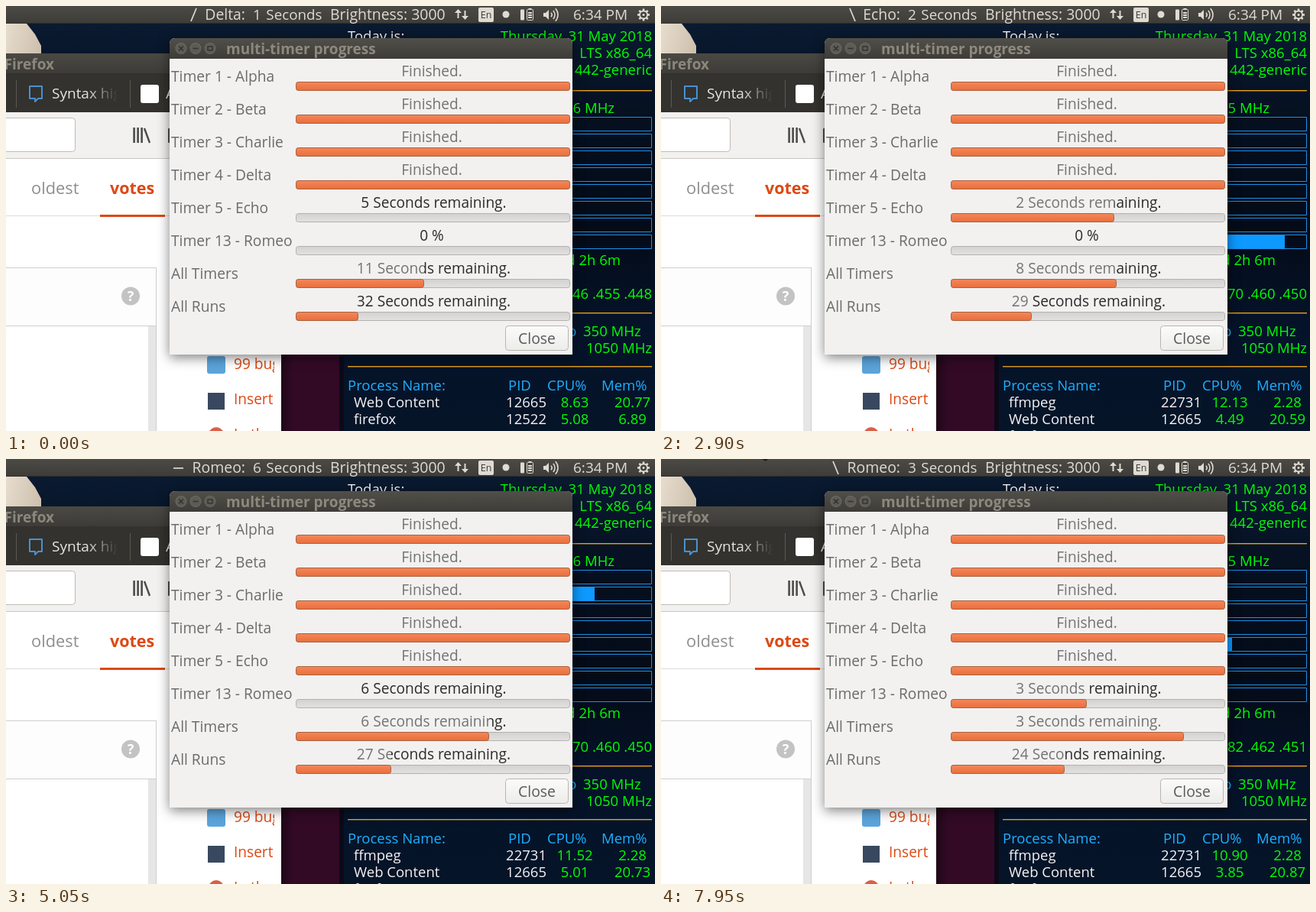
An HTML page with a canvas that plays this animation: 849 px wide and 556 px high, repeating every 8000 ms.

```html
<!DOCTYPE html>
<html lang="en">
<head>
<meta charset="utf-8">
<title>Timer progress</title>
<style>
html, body { margin: 0; width: 100%; height: 100%; overflow: hidden; background: #04101e; }
canvas { display: block; }
</style>
</head>
<body>
<canvas id="stage" width="849" height="556"></canvas>
<script>
const W = 849, H = 556, LOOP = 8000;
const FONT = '"Open Sans", "Noto Sans", sans-serif';
const GREEN = '#00ff00', CYAN = '#1cb0ff', WHITE = '#f4f4f4', ORANGE = '#dd4814';
const screen = document.getElementById('stage').getContext('2d');
let c = screen;

// [time, timer name, seconds]
const PANEL = [
  [0, 'Delta', 1], [100, 'Echo', 5], [1050, 'Echo', 4], [2250, 'Echo', 3], [2900, 'Echo', 2],
  [3850, 'Echo', 1], [5050, 'Romeo', 6], [6000, 'Romeo', 5], [6950, 'Romeo', 4], [7900, 'Romeo', 3]
];
const SPIN = '/-\\|';
const SPIN_TIMES = [0, 100, 400, 700, 1050, 2550, 2900, 3200, 3550, 3850, 4150, 4500, 4800,
  5050, 5400, 5700, 6000, 6350, 6650, 6950, 7200, 7550, 7900];

// [time, Echo seconds, Echo end, Romeo seconds, Romeo end, total seconds, total end, runs end]
const BARS = [
  [0, 5, 379, -1, 379, 11, 547, 461],
  [750, 4, 449, -1, 379, 10, 564, 472],
  [2250, 3, 521, -1, 379, 9, 580, 479],
  [2700, 2, 593, -1, 379, 8, 596, 485],
  [3700, 1, 665, -1, 379, 7, 614, 496],
  [4650, 1, 738, -1, 379, 7, 614, 496],
  [4800, 0, 738, -1, 379, 7, 614, 496],
  [4950, 0, 738, 6, 379, 6, 632, 504],
  [5650, 0, 738, 5, 436, 5, 650, 515],
  [6650, 0, 738, 4, 496, 4, 667, 522],
  [7700, 0, 738, 3, 557, 3, 684, 528]
];

// [time, clock digit, load, gpu MHz, busy core, busy end, cpu 1, mem 1, cpu 2, mem 2]
const LOAD = ['.446 .455 .448', '.470 .460 .450', '.482 .462 .451'];
const MONITOR = [
  [0, 6, 0, 350, 0, 0, '8.63', '20.77', '5.08', '6.89'],
  [450, 7, 0, 350, 0, 0, '8.52', '20.80', '5.61', '6.89'],
  [1200, 5, 0, 350, 0, 0, '8.43', '20.84', '6.07', '6.88'],
  [2250, 6, 1, 350, 0, 0, '12.31', '2.28', '4.62', '20.55'],
  [2650, 5, 1, 350, 8, 816, '12.13', '2.28', '4.49', '20.59'],
  [3400, 7, 1, 350, 0, 0, '12.08', '2.28', '4.57', '20.64'],
  [4200, 9, 1, 1033, 0, 0, '12.04', '2.28', '4.68', '20.69'],
  [4900, 6, 1, 350, 2, 770, '11.52', '2.28', '5.01', '20.73'],
  [5700, 8, 1, 350, 0, 0, '10.82', '2.28', '5.82', '20.75'],
  [6350, 6, 1, 350, 0, 0, '10.84', '2.28', '5.17', '20.79'],
  [7200, 7, 2, 350, 0, 0, '10.87', '2.28', '4.46', '20.83'],
  [7900, 5, 2, 350, 5, 747, '10.90', '2.28', '3.85', '20.87']
];

const pick = (list, t) => list.filter(s => s[0] <= t).pop();

function text(s, x, y, color, size = 19.1, align = 'left', weight = 400) {
  c.font = `${weight} ${size}px ${FONT}`;
  c.textAlign = align;
  c.fillStyle = color;
  c.fillText(s, x, y);
}
function rect(x, y, w, h, color) {
  c.fillStyle = color;
  c.fillRect(x, y, w, h);
}
function round(x, y, w, h, r, fill, stroke) {
  c.beginPath();
  c.roundRect(x, y, w, h, r);
  if (fill) { c.fillStyle = fill; c.fill(); }
  if (stroke) { c.strokeStyle = stroke; c.lineWidth = 1; c.stroke(); }
}
function disc(x, y, r, color) {
  c.beginPath();
  c.arc(x, y, r, 0, 7);
  c.fillStyle = color;
  c.fill();
}
function path(points, color, width) {
  c.beginPath();
  points.forEach(([x, y]) => c.lineTo(x, y));
  c.strokeStyle = color;
  c.lineWidth = width;
  c.stroke();
}
function poly(points, color) {
  c.beginPath();
  points.forEach(([x, y]) => c.lineTo(x, y));
  c.fillStyle = color;
  c.fill();
}
function ramp(x0, y0, x1, y1, ...colors) {
  const g = c.createLinearGradient(x0, y0, x1, y1);
  colors.forEach((k, i) => g.addColorStop(i / (colors.length - 1), k));
  return g;
}
function clipped(x, y, w, h, draw) {
  c.save();
  c.beginPath();
  c.rect(x, y, w, h);
  c.clip();
  draw();
  c.restore();
}

function wallpaper() {
  rect(0, 0, W, H, ramp(0, 23, 0, H, '#0a1a30', '#050f1f', '#040b18', '#05132a', '#061428'));
  poly([[0, 23], [27, 23], [38, 37], [46, 52], [46, 63], [0, 63]], ramp(0, 30, 46, 40, '#e6dccd', '#cfc1af'));
  rect(360, 440, 76, 116, ramp(360, 0, 376, 0, '#1f0717', '#330a26'));
  rect(436, 440, 6, 116, '#0c0a18');
}

function browser() {
  round(-10, 62, 300, 40, 6, ramp(0, 62, 0, 88, '#4b4944', '#3d3c38'));
  text('Firefox', 63, 83, '#8b877c', 19, 'right', 700);
  rect(0, 88, 214, 51, '#33322e');
  rect(13, 97, 1, 36, '#5a5954');
  rect(162, 97, 1, 36, '#5a5954');
  c.lineJoin = 'round';
  path([[32, 105], [47, 105], [47, 121], [42, 121], [38, 125], [38, 121], [31, 121], [31, 105], [34, 105]], '#4a90d0', 2);
  text('Syntax hig', 60, 121, ramp(105, 0, 146, 0, '#e8e6e1', '#33322e'), 19);
  round(176, 103, 24, 24, 3, '#fff');
  text('A', 209, 121, '#e8e6e1', 19);

  rect(0, 139, 360, 61, '#f2f1f0');
  rect(0, 199, 360, 1, '#c9c7c4');
  round(-10, 146.5, 100.5, 44, 4, '#fff', '#bdbbb8');
  [167.5, 172.5, 177.5].forEach(x => rect(x - 1.2, 159, 2.6, 20, '#4c4c4c'));
  path([[181, 160], [188, 179]], '#4c4c4c', 2.4);
  path([[217, 161], [213, 161], [213, 178], [217, 178]], '#4c4c4c', 2);

  rect(0, 200, 360, 356, '#fff');
  text('oldest', 33, 246, '#8f8f8f', 21.8);
  text('votes', 136, 246, ORANGE, 21.5, 'left', 700);
  rect(0, 274, 214, 1, '#dcdcdc');
  rect(123, 273, 85, 3, ORANGE);
  rect(0, 342, 197, 77, '#fdfdfd');
  rect(0, 342, 197, 1, '#cfcfcf');
  rect(0, 418, 197, 1, '#cfcfcf');
  rect(196, 342, 1, 214, '#cfcfcf');
  rect(186, 419, 10, 137, '#e6e6e6');
  disc(163, 379.5, 12, '#c3c3c3');
  text('?', 163, 386, '#fff', 18, 'center', 700);

  round(263, 458, 24, 23, 3, '#5ba4db');
  rect(264, 506, 22, 22, '#39485f');
  disc(275, 561, 10, '#d9604a');
  clipped(290, 440, 61, 116, () => {
    text('99 bugs', 298, 475, ORANGE);
    text('Inserting', 298, 521, ORANGE);
    text('In the', 298, 567, ORANGE);
  });
}

function panelBar() {
  const ink = '#dfdbd2';
  rect(0, 0, W, 23, ramp(0, 0, 0, 23, '#4c4a45', '#3d3c38'));
  rect(0, 22, W, 1, '#2f2e2b');
  text('Brightness: 3000', 424, 18, ink, 19.4);
  poly([[587, 9], [591.5, 4], [596, 9]], ink);
  rect(590.5, 8, 2, 8, ink);
  poly([[596, 13], [600.5, 18], [605, 13]], ink);
  rect(599.5, 6, 2, 8, ink);
  round(618, 2, 20, 19, 2, ink);
  text('En', 628, 16, '#3c3b37', 12.5, 'center');
  disc(654, 11, 4.5, ink);
  round(673, 4.5, 5, 14, 1, ink);
  round(681.5, 4.5, 8, 14, 1, null, ink);
  rect(683.5, 3, 4, 2, ink);
  [8, 11, 14].forEach(y => rect(683, y, 5, 2, ink));
  poly([[703, 9], [706, 9], [710, 5], [710, 18], [706, 14], [703, 14]], ink);
  [4, 8, 12].forEach(r => {
    c.beginPath();
    c.arc(710, 11.5, r, -0.75, 0.75);
    c.strokeStyle = ink;
    c.lineWidth = 1.6;
    c.stroke();
  });
  text('6:34 PM', 742, 18, ink, 19);
  for (let i = 0; i < 8; i++) {
    const a = i * Math.PI / 4, x = Math.cos(a), y = Math.sin(a);
    path([[834 + x * 5, 11.5 + y * 5], [834 + x * 8, 11.5 + y * 8]], ink, 2.6);
  }
  c.beginPath();
  c.arc(834, 11.5, 5, 0, 7);
  c.strokeStyle = ink;
  c.lineWidth = 1.8;
  c.stroke();
  disc(834, 11.5, 1.5, ink);
}

const info = (s, x, y, color, align) => text(s, x, y, color, 18.5, align);

function monitorBase() {
  info('Today is:', 447, 46, WHITE);
  info('Thursday, 31 May 2018', 845, 46, GREEN, 'right');
  info('LTS x86_64', 845, 68, GREEN, 'right');
  info('442-generic', 845, 90, GREEN, 'right');
  [110, 401, 471].forEach(y => rect(447, y, 398, 1.4, '#e8a11c'));
  for (let i = 0; i < 8; i++) {
    c.strokeStyle = '#1e8fe6';
    c.lineWidth = 1;
    c.strokeRect(447.5, 145.5 + i * 22, 397, 18);
  }
  info('0d 2h 6m', 804, 339, GREEN, 'right');
  info('o', 746.5, 432, CYAN, 'right');
  info('1050 MHz', 845, 454, GREEN, 'right');
  info('Process Name:', 447, 503, CYAN);
  info('PID', 657, 503, CYAN);
  info('CPU%', 708, 503, CYAN);
  info('Mem%', 779, 503, CYAN);
}

function monitor(t) {
  const [, digit, load, gpu, core, end, cpu1, mem1, cpu2, mem2] = pick(MONITOR, t);
  info(`299${digit} MHz`, 796, 140, GREEN, 'right');
  if (core) rect(448, 124 + core * 22, end - 448, 17, '#0d99ff');
  info(LOAD[load], 845, 383, GREEN, 'right');
  info(`${gpu} MHz`, 755, 432, GREEN);
  const web = ['Web Content', 12665], fox = ['firefox', 12522];
  const rows = load ? [['ffmpeg', 22731], web, fox] : [web, fox];
  rows.forEach(([name, pid], i) => {
    const y = 525 + i * 22;
    info(name, 455, y, WHITE);
    info(pid, 707, y, WHITE, 'right');
    info([cpu1, cpu2, '3.90'][i], 744, y, GREEN, 'center');
    info([mem1, mem2, '6.88'][i], 819.5, y, GREEN, 'center');
  });
}

function dialog() {
  c.save();
  c.shadowColor = 'rgba(0,0,0,.5)';
  c.shadowBlur = 16;
  c.shadowOffsetY = 4;
  round(214, 42, 527, 414, [7, 7, 0, 0], '#f2f1f0');
  c.restore();
  round(214, 42, 527, 27, [7, 7, 0, 0], ramp(0, 42, 0, 69, '#514f49', '#3d3c38'));
  [229, 248, 267].forEach(x => {
    disc(x, 55.5, 7.5, '#6b6962');
    disc(x, 55.5, 6.5, '#5d5b55');
  });
  const mark = '#34332f';
  path([[226, 52.5], [232, 58.5]], mark, 1.6);
  path([[232, 52.5], [226, 58.5]], mark, 1.6);
  path([[244.5, 55.5], [251.5, 55.5]], mark, 1.6);
  c.lineWidth = 1.4;
  c.strokeRect(264, 53, 6, 5);
  text('multi-timer progress', 288, 63, '#8d897e', 19, 'left', 700);
  ['Timer 1 - Alpha', 'Timer 2 - Beta', 'Timer 3 - Charlie', 'Timer 4 - Delta', 'Timer 5 - Echo',
    'Timer 13 - Romeo', 'All Timers', 'All Runs'].forEach((s, i) => text(s, 216, 99 + i * 43, '#6b6b6b', 19.2));
  round(653.5, 418.5, 82, 32, 4, ramp(0, 418, 0, 451, '#fbfbfa', '#ececea'), '#b9b6b1');
  text('Close', 694.5, 442, '#5a5a5a', 19.4, 'center');
}

function bar(row, label, end) {
  const y = 99 + row * 43, base = y - 7;
  round(379.5, y + .5, 358, 11, 3, ramp(0, y, 0, y + 12, '#d2d1d0', '#e3e2e1'), '#b4b2b0');
  if (end > 379) {
    round(379.5, y + .5, end - 380, 11, 3, ramp(0, y, 0, y + 12, '#f5885a', '#e86d3b'), '#a8623f');
  }
  const caption = color => text(label, 557, base, color, 19.1, 'center');
  clipped(379, base - 18, end - 379, 25, () => caption('#737373'));
  clipped(end, base - 18, 740 - end, 25, () => caption('#2b2b2b'));
}

function progress(t) {
  const [, echo, echoEnd, romeo, romeoEnd, total, totalEnd, runsEnd] = pick(BARS, t);
  const left = n => ` ${n} Seconds remaining.`;
  for (let i = 0; i < 4; i++) bar(i, 'Finished.', 738);
  bar(4, echo ? left(echo) : 'Finished.', echoEnd);
  bar(5, romeo < 0 ? '0 %' : left(romeo), romeoEnd);
  bar(6, left(total), totalEnd);
  bar(7, left(total + 21), runsEnd);
}

function indicator(t) {
  const ink = '#dfdbd2';
  const [, name, secs] = pick(PANEL, t);
  text(name + ':', 313, 18, ink, 19.4, 'right');
  text(secs, 323, 18, ink, 19);
  text('Seconds', 413.5, 18, ink, 18.8, 'right');
  const right = { Delta: 250, Echo: 255, Romeo: 233 }[name];
  const turn = SPIN[(SPIN_TIMES.filter(s => s <= t).length - 1) % 4];
  const line = {
    '/': [[right - 8, 20], [right - 1, 3]],
    '\\': [[right - 8, 3], [right - 1, 20]],
    '|': [[right - 3, 2.5], [right - 3, 21.5]],
    '-': [[right - 14, 12], [right - 1, 12]]
  }[turn];
  path(line, ink, 1.7);
  if (t >= 6950) poly([[132, 0], [140, 0], [137, 3]], '#1f1e1b');
}

function layer(...parts) {
  const canvas = document.createElement('canvas');
  canvas.width = W;
  canvas.height = H;
  c = canvas.getContext('2d');
  parts.forEach(p => p());
  c = screen;
  return canvas;
}
const back = layer(wallpaper, browser, panelBar, monitorBase);
const front = layer(dialog);

const start = performance.now();
function frame(now) {
  const t = Math.max(0, now - start) % LOOP;
  c.drawImage(back, 0, 0);
  monitor(t);
  c.drawImage(front, 0, 0);
  progress(t);
  indicator(t);
  requestAnimationFrame(frame);
}
frame(start);
</script>
</body>
</html>
```
